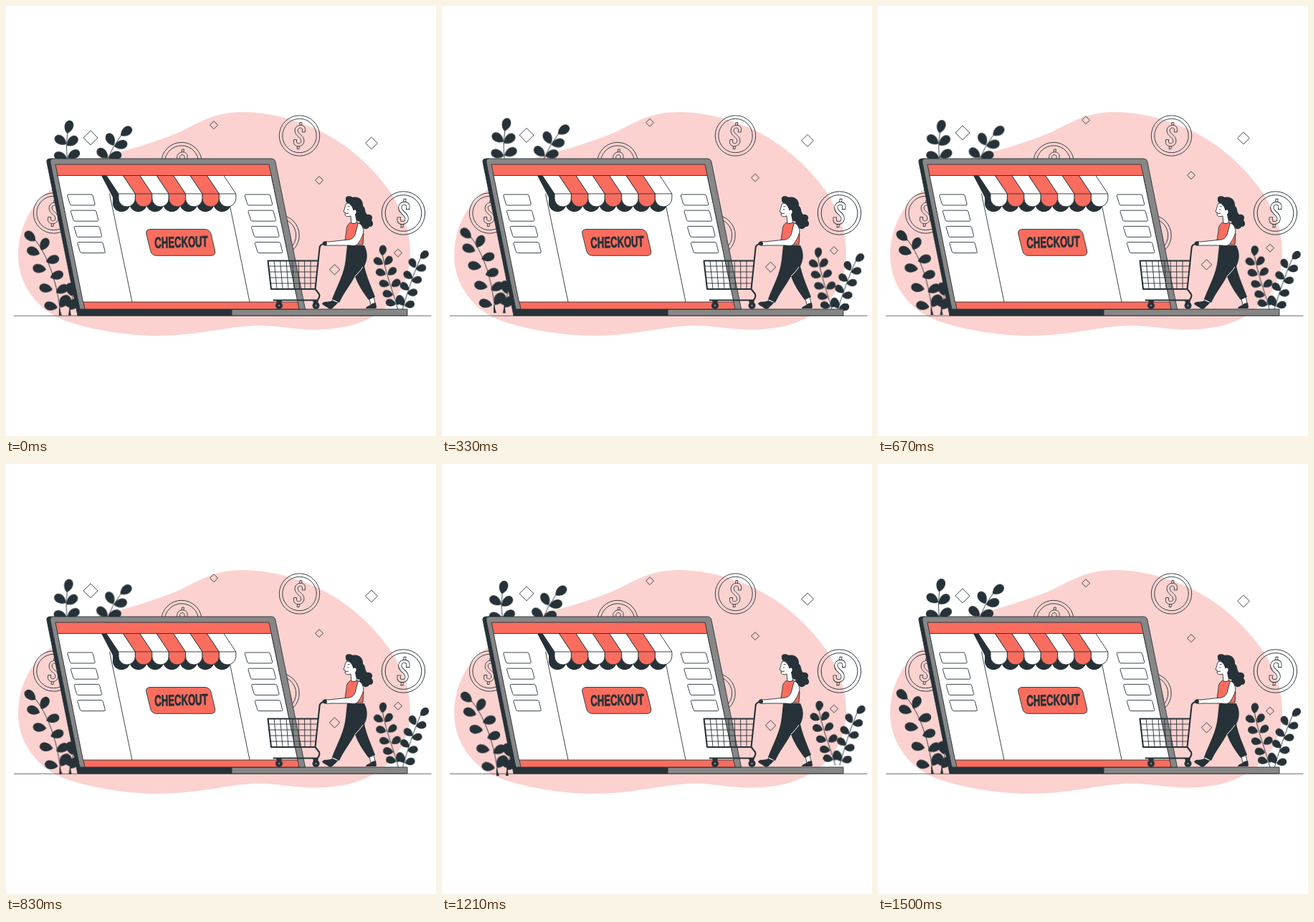
Animation of 600x600 px, one loop 1.54 s. Source, as an HTML page without scripts:

```html
<!DOCTYPE html>
<html lang="en">
<head>
<meta charset="utf-8">
<title>Checkout</title>
<style>
  html, body { margin: 0; height: 100%; overflow: hidden; background: #fff; }
  svg { display: block; width: 100vw; height: 100vh; }
  .dark { fill: #263238; }
  .coral { fill: #fa6d5e; }
  .white { fill: #fff; }
  .grey { fill: #878787; }
  .line { stroke: #263238; stroke-width: .9; }
  .open { fill: none; }
  .float { animation: float 1.54s linear -20ms infinite; }
  .wind { transform-origin: 308px 297px; animation: wind 1.54s linear -20ms infinite; }
  .label { font: 700 21.5px "Liberation Sans", Arial, sans-serif; text-anchor: middle; stroke: #263238; stroke-width: .8; }
  @keyframes float { 50% { transform: translateY(-8px); } }
  @keyframes wind {
    0%, 100% { transform: rotate(0deg); }
    25% { transform: rotate(1deg); }
    75% { transform: rotate(-1deg); }
  }
</style>
</head>
<body>
<svg viewBox="0 0 600 600">
  <defs>
    <path id="leaf" d="M0 0C-6 -4 -8.500 -13 -3.500 -17.500Q0 -20 3.500 -17.500C8.500 -13 6 -4 0 0Z"/>
    <path id="small" d="M0 0C-5 -3 -7 -10 -3 -13.500Q0 -15.500 3 -13.500C7 -10 5 -3 0 0Z"/>
    <path id="diamond" d="M0 -10L10 0L0 10L-10 0Z" vector-effect="non-scaling-stroke"/>
    <g id="coin" class="open line">
      <circle r="28.200"/>
      <circle r="23.700"/>
      <g transform="skewX(-6) scale(.88 1)">
        <path d="M3.600 -5H8.200V-8C8.200 -17 -8.200 -17 -8.200 -8C-8.200 1 3.600 1.500 3.600 8C3.600 11.800 -3.600 11.800 -3.600 8V5.500H-8.200V8C-8.200 17 8.200 17 8.200 8C8.200 -1 -3.600 -1.500 -3.600 -8C-3.600 -11.800 3.600 -11.800 3.600 -8Z"/>
        <path d="M-1.600 -14.600V-18.500H1.600V-14.600M-1.600 14.600V18.500H1.600V14.600"/>
      </g>
    </g>
    <path id="tab" class="white line" d="M1.500 0H33.500Q35.300 0 35.800 2L38.600 13Q39 15 37.200 15H6Q4.200 15 3.700 13L.3 2Q0 0 1.500 0Z"/>
    <g id="tabs">
      <use href="#tab"/>
      <use href="#tab" x="4.700" y="22.200"/>
      <use href="#tab" x="9.400" y="44.400"/>
      <use href="#tab" x="14.100" y="66.600"/>
    </g>
    <path id="flap" d="M0 0H23.400L40.400 25.500V32A11.700 11.500 0 0 1 17 32V25.500Z"/>
    <path id="scallop" d="M9 29H33.400V39A12 11.500 0 0 1 9 39Z"/>
  </defs>

  <path fill="#fbd2cf" d="M17 348C17 310 35 275 65 255C90 238 105 220 130 212C165 202 200 193 232 180C265 167 285 148 330 148C385 148 440 170 478 199C525 236 564 285 564 345C564 400 525 440 465 449C420 456 390 447 360 446C320 445 290 455 240 459C190 463 130 455 85 440C45 426 17 390 17 348Z"/>

  <!-- coins -->
  <use href="#coin" x="409.500" y="181"/>
  <use href="#coin" x="245" y="218.500"/>
  <use href="#coin" x="66.500" y="289"/>
  <use href="#coin" x="381" y="320"/>
  <use href="#coin" transform="translate(554.500 289) scale(1.070)"/>

  <!-- diamonds -->
  <g class="float open line">
    <use href="#diamond" x="118" y="184"/>
    <use href="#diamond" transform="translate(290 166.300) scale(.55)"/>
    <use href="#diamond" transform="translate(510 191.500) scale(.84)"/>
    <use href="#diamond" transform="translate(437 243.300) scale(.55)"/>
    <use href="#diamond" transform="translate(547 344.800) scale(.55)"/>
    <use href="#diamond" transform="translate(458.500 368) scale(.72)"/>
  </g>

  <path stroke="#263238" stroke-width=".7" d="M11 432.300H593.500"/>

  <!-- plants -->
  <g class="wind dark">
    <path class="open line" d="M76 432C74 400 63 355 41 327M88 432C90 415 95 400 97 385M86 216Q83 198 86 176M141 216Q148 197 161 180M547 424C541 400 530 375 525 345M553 424C560 400 568 375 578 352"/>
    <path d="M74 420L78 432H74ZM89 420L91 432H87Z"/>
    <use href="#leaf" transform="translate(41 328) rotate(-49)"/>
    <use href="#leaf" transform="translate(49 341) rotate(28)"/>
    <use href="#leaf" transform="translate(47 346) rotate(-70)"/>
    <use href="#leaf" transform="translate(56 357) rotate(73)"/>
    <use href="#leaf" transform="translate(56 368) rotate(-82)"/>
    <use href="#leaf" transform="translate(62 379) rotate(72)"/>
    <use href="#leaf" transform="translate(65 396) rotate(-78)"/>
    <use href="#leaf" transform="translate(70 400) rotate(62)"/>
    <use href="#leaf" transform="translate(72 421) rotate(-78)"/>
    <use href="#leaf" transform="translate(76 421) rotate(28)"/>
    <use href="#leaf" transform="translate(92 405) rotate(-12)"/>
    <use href="#leaf" transform="translate(89 421) rotate(-22)"/>
    <use href="#leaf" transform="translate(89 424) rotate(38)"/>

    <use href="#leaf" transform="translate(85 178) rotate(15)"/>
    <use href="#leaf" transform="translate(84 193) rotate(-56)"/>
    <use href="#leaf" transform="translate(85 195) rotate(50)"/>
    <use href="#leaf" transform="translate(85 213) rotate(-72)"/>
    <use href="#leaf" transform="translate(86 212) rotate(62)"/>
    <use href="#leaf" transform="translate(160 181) rotate(53)"/>
    <use href="#leaf" transform="translate(150 195) rotate(-26)"/>
    <use href="#leaf" transform="translate(151 196) rotate(76)"/>
    <use href="#leaf" transform="translate(142 212) rotate(-50)"/>
    <use href="#leaf" transform="translate(143 212) rotate(74)"/>

    <use href="#small" transform="translate(525 348) rotate(6)"/>
    <use href="#small" transform="translate(526 360) rotate(-60)"/>
    <use href="#small" transform="translate(529 361) rotate(38)"/>
    <use href="#small" transform="translate(530 374) rotate(-72)"/>
    <use href="#small" transform="translate(533 375) rotate(50)"/>
    <use href="#small" transform="translate(535 389) rotate(-76)"/>
    <use href="#small" transform="translate(538 391) rotate(54)"/>
    <use href="#small" transform="translate(540 403) rotate(-78)"/>
    <use href="#small" transform="translate(544 416) rotate(-74)"/>
    <use href="#small" transform="translate(546 417) rotate(20)"/>
    <use href="#small" transform="translate(578 352) rotate(48)"/>
    <use href="#small" transform="translate(571 365) rotate(-28)"/>
    <use href="#small" transform="translate(572 367) rotate(78)"/>
    <use href="#small" transform="translate(567 380) rotate(-52)"/>
    <use href="#small" transform="translate(566 383) rotate(82)"/>
    <use href="#small" transform="translate(562 396) rotate(-50)"/>
    <use href="#small" transform="translate(560 401) rotate(80)"/>
    <use href="#small" transform="translate(555 418) rotate(-28)"/>
    <use href="#small" transform="translate(556 418) rotate(76)"/>
  </g>

  <!-- laptop -->
  <path class="dark line" d="M62 213Q56 213 57 218L100 432H315V423H110L66 213Z"/>
  <path class="grey line" d="M315 423H560V432H315Z"/>
  <path class="grey line" d="M66 213H370Q375 213 376 218L417.500 423H103L62 219Q61 213 66 213Z"/>
  <path class="coral line" d="M69 221H367L409 423H110Z"/>
  <path class="white line" d="M72 236.500H370L407 413H107.500Z"/>
  <path class="open line" d="M144.500 262L176 413M309 262L340 413"/>
  <use href="#tabs" x="85.500" y="263"/>
  <use href="#tabs" x="333" y="263"/>

  <!-- awning -->
  <g class="dark">
    <path d="M133 236.500H141L160 262V277H149L150 269Z"/>
    <use href="#scallop" x="140" y="236.500"/>
    <use href="#scallop" x="163.400" y="236.500"/>
    <use href="#scallop" x="186.800" y="236.500"/>
    <use href="#scallop" x="210.200" y="236.500"/>
    <use href="#scallop" x="233.600" y="236.500"/>
    <use href="#scallop" x="257" y="236.500"/>
    <use href="#scallop" x="280.400" y="236.500"/>
  </g>
  <g class="line">
    <use href="#flap" class="white" x="140" y="236.500"/>
    <use href="#flap" class="coral" x="163.400" y="236.500"/>
    <use href="#flap" class="white" x="186.800" y="236.500"/>
    <use href="#flap" class="coral" x="210.200" y="236.500"/>
    <use href="#flap" class="white" x="233.600" y="236.500"/>
    <use href="#flap" class="coral" x="257" y="236.500"/>
    <use href="#flap" class="white" x="280.400" y="236.500"/>
    <path d="M157 262H320.800"/>
  </g>

  <!-- button -->
  <path class="coral line" d="M202 311.500H277Q284 311.500 286 318L291.500 341Q293 348.300 286 348.300H210Q203 348.300 201.500 341L195.800 318Q194.500 311.500 202 311.500Z"/>
  <text class="label dark" transform="translate(244.700 336.800) rotate(-1.500) scale(.61 1)">CHECKOUT</text>

  <!-- shopper -->
  <path class="white line" d="M507 408L509 417L515 415L513 405ZM457 408L452 416L459 418L465 411Z"/>
  <path class="dark" d="M456 411C450 414 445 411 441 415C442 418 447 419 450 422C453 424 456 422 458 419L463 414ZM516 414L517 420Q517 422 514 422H502C502 419 509 418 511 415Z"/>
  <path class="dark" d="M476 334H500C505 344 505 353 500 363C504 380 510 392 515 406L506 410C498 399 491 389 487 377C480 390 471 401 465 414L455 409C462 390 472 374 474 353Z"/>
  <path fill="none" stroke="#fff" d="M498 364C495 369 491 373 487 377"/>
  <path class="dark" d="M474 270C473 265 479 264 484 267C492 265 499 271 498 279C502 281 500 287 504 291C510 290 513 295 510 299C514 303 512 309 507 308C505 312 499 312 498 309C492 310 491 304 494 301C488 300 484 295 485 290L479 275C475 275 474 273 474 270Z"/>
  <path class="white line" d="M475 275C473 279 473 282 471 287L473.500 288C472 293 475 295 481 293L482 304L490 303L487.500 291C491 287 488 282 484.500 285C485 280 482 276 475 275Z"/>
  <path class="dark" d="M474 271C479 275 483 279 484.500 285L487 283L490 287L493 280L486 268Z"/>
  <path class="open line" d="M476.500 280L479.500 279.500M477 283V285M473.500 290L478 289"/>
  <path class="coral line" d="M481 302C476 305 475 309 475 314L472 333H498L499 318L494 304L489 302C487 304 483 304 481 302Z"/>
  <path class="white line" d="M491 304C495 302 498 308 499 314C498 321 494 328 490 333C487 335 484 334.500 480 334L452 334C448 335 444 334 442 332C441 329 446 328 450 329L479 326C484 325 487 321 488 316Z"/>

  <!-- cart -->
  <path class="open line" d="M374 355L378 395M382.500 355L386 395M391 355L394 395M399.500 355L402 395M408 355L409.500 395M416.500 355L417 395M425 355V395M366 363H435M367 371H434M368 379H433M369 387H432"/>
  <g fill="none" stroke="#263238" stroke-width="2.100" stroke-linejoin="round" stroke-linecap="round">
    <path d="M446 331.500C441 332 438 333 437.500 338L431.500 395H370L365.500 355.500H435.500"/>
    <path d="M431.500 395L437 402Q438.500 406 434.500 410.500H373.500"/>
  </g>
  <circle class="dark" cx="445" cy="331.500" r="3"/>
  <path class="dark" d="M377 411H385L383 418H379ZM428 411H436L434 418H430Z"/>
  <circle class="dark" cx="381" cy="418" r="5"/>
  <circle class="dark" cx="432.500" cy="418" r="5"/>
  <circle class="grey" cx="381" cy="418" r="1.300"/>
  <circle class="grey" cx="432.500" cy="418" r="1.300"/>
</svg>
</body>
</html>
```
